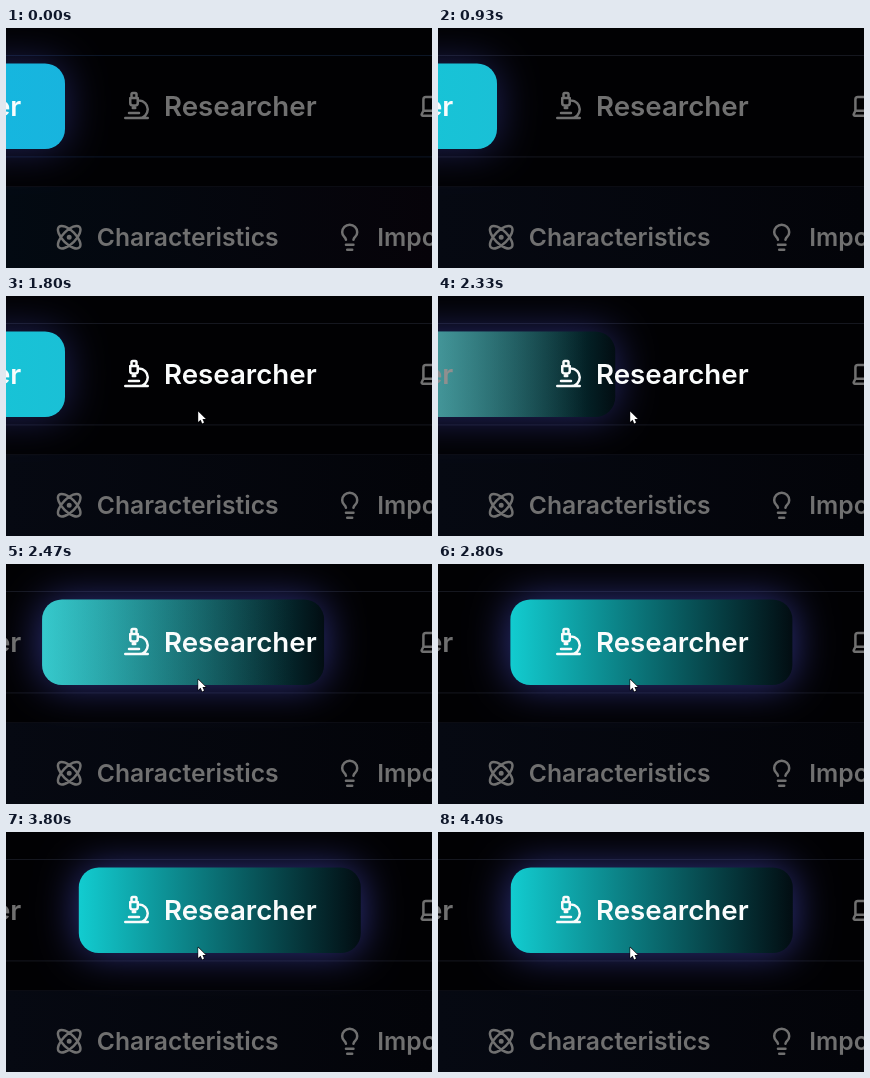
Write an HTML page with a canvas that moves like this. It is 426 px wide and 240 px high and loops after 5.87 s.

```html
<!DOCTYPE html>
<html lang="en">
<head>
<meta charset="utf-8">
<title>Role tabs</title>
<style>
html, body { margin: 0; width: 100%; height: 100%; overflow: hidden; background: #000; }
canvas { display: block; width: 426px; height: 240px; }
</style>
</head>
<body>
<canvas id="stage"></canvas>
<script>
const W = 426, H = 240, LOOP = 5870;
const canvas = document.getElementById('stage');
const ctx = canvas.getContext('2d');
const dpr = window.devicePixelRatio || 1;
canvas.width = Math.round(W * dpr);
canvas.height = Math.round(H * dpr);

// 24-unit line icons
const ICONS = {
  microscope: 'M6 18h8M3 22h18M14 22a7 7 0 1 0 0-14h-1M9 14h2M9 12a2 2 0 0 1-2-2V6h6v4a2 2 0 0 1-2 2ZM12 6V3a1 1 0 0 0-1-1H9a1 1 0 0 0-1 1v3',
  laptop: 'M20 16V7a2 2 0 0 0-2-2H6a2 2 0 0 0-2 2v9m16 0H4m16 0 1.28 2.55a1 1 0 0 1-.9 1.45H3.62a1 1 0 0 1-.9-1.45L4 16',
  atom: 'M11 12a1 1 0 1 0 2 0a1 1 0 1 0-2 0M20.2 20.2c2.04-2.03.02-7.36-4.5-11.9-4.54-4.52-9.87-6.54-11.9-4.5-2.04 2.03-.02 7.36 4.5 11.9 4.54 4.52 9.87 6.54 11.9 4.5ZM15.7 15.7c4.52-4.54 6.54-9.87 4.5-11.9-2.03-2.04-7.36-.02-11.9 4.5-4.52 4.54-6.54 9.87-4.5 11.9 2.03 2.04 7.36.02 11.9-4.5Z',
  bulb: 'M15 14c.2-1 .7-1.7 1.5-2.5 1-.9 1.5-2.2 1.5-3.5A6 6 0 0 0 6 8c0 1 .2 2.2 1.5 3.5.7.7 1.3 1.5 1.5 2.5M9 18h6M10 22h4'
};
for (const name in ICONS) ICONS[name] = new Path2D(ICONS[name]);
const ARROW = new Path2D('M0 0V10.6L2.4 8.4L4 12L5.8 11.2L4.3 7.7H7.6Z');

const GREY = [112, 112, 112], WHITE = [250, 252, 252], BLUE = [112, 132, 250];

const clamp = v => Math.max(0, Math.min(1, v));
const ramp = (t, from, to) => clamp((t - from) / (to - from));
const lerp = (a, b, k) => a + (b - a) * k;
const mix = (a, b, k) => a.map((v, i) => lerp(v, b[i], k));
const rgb = (c, alpha = 1) => `rgba(${c.map(Math.round).join(',')},${alpha})`;

function box(x, y, w, h, r) {
  ctx.beginPath();
  ctx.roundRect(x, y, w, h, r);
}

function shade(x0, x1, from, to) {
  const g = ctx.createLinearGradient(x0, 0, x1, 0);
  g.addColorStop(0, from);
  g.addColorStop(1, to);
  return g;
}

function icon(name, cx, cy, color, scale = 1.25) {
  ctx.save();
  ctx.translate(cx - 12 * scale, cy - 12 * scale);
  ctx.scale(scale, scale);
  ctx.lineWidth = 2;
  ctx.lineCap = ctx.lineJoin = 'round';
  ctx.strokeStyle = rgb(color);
  ctx.stroke(ICONS[name]);
  ctx.restore();
}

function label(text, x, y, size, color, align = 'left') {
  ctx.font = `600 ${size}px Inter, "Open Sans", sans-serif`;
  ctx.textAlign = align;
  ctx.fillStyle = rgb(color);
  ctx.fillText(text, x, y);
}

function backdrop(warm) {
  ctx.fillStyle = '#010103';
  ctx.fillRect(0, 0, W, H);
  ctx.fillStyle = shade(0, W, rgb(mix([3, 10, 18], [6, 9, 18], warm)), rgb(mix([6, 3, 9], [3, 4, 9], warm)));
  ctx.fillRect(0, 158, W, H - 158);
  ctx.fillStyle = rgb(mix([12, 22, 38], [21, 23, 31], warm));
  ctx.fillRect(0, 27, W, 1);
  ctx.fillRect(0, 128.4, W, 1);
  ctx.fillStyle = 'rgb(11,12,19)';
  ctx.fillRect(0, 158, W, 1);
}

// Active pill sliding from the first tab to the second
function pill(p, blend, warm) {
  const x = lerp(-223, 72.8, p), y = 35.5, w = 282, h = 85.5;
  const left = mix([14, 190, 226], [14, 206, 216], warm);
  const right = mix([24, 180, 222], [26, 192, 214], warm);
  ctx.save();
  ctx.shadowColor = rgb([80, 86, 220], lerp(0.4, 0.6, p));
  ctx.shadowBlur = 42 * dpr;
  ctx.fillStyle = shade(x, x + w, rgb(mix(left, [18, 204, 208], blend)), rgb(mix(right, [2, 13, 18], blend)));
  box(x, y, w, h, 20);
  ctx.fill();
  ctx.restore();

  const haze = 0.5 * Math.sin(Math.PI * p);
  if (haze > 0.01) {
    ctx.fillStyle = shade(x, x + w * 0.9, `rgba(210,190,190,${haze})`, 'rgba(210,190,190,0)');
    box(x, y, w, h, 20);
    ctx.fill();
  }
}

function cursor(t) {
  if (t < 930) return;
  const k = ramp(t, 930, 1480);
  ctx.save();
  ctx.translate(lerp(210, 192.2, 1 - (1 - k) ** 2.6), lerp(245, 115.4, 1 - (1 - k) ** 1.36));
  ctx.lineWidth = 1.2;
  ctx.lineJoin = 'round';
  ctx.strokeStyle = '#08080c';
  ctx.stroke(ARROW);
  ctx.fillStyle = '#fff';
  ctx.fill(ARROW);
  ctx.restore();
}

function draw(t) {
  const warm = ramp(t, 130, 600);
  const s = Math.max(0, t - 2245) * 0.016;
  const p = 1 - (1 + s) * Math.exp(-s);
  const blend = ramp(t, 2245, 2330);
  const hover = ramp(t, 950, 1090) * (1 - ramp(t, 1205, 1400));
  const lit = ramp(t, 1440, 1640);

  ctx.setTransform(dpr, 0, 0, dpr, 0, 0);
  backdrop(warm);
  pill(p, blend, warm);

  label('Explorer', 15.3, 88, 27.7, mix(WHITE, GREY, ramp(t, 2230, 2360)), 'right');
  const main = mix(GREY, WHITE, lit);
  icon('microscope', 130.5, 77.6, main);
  label('Researcher', 158, 88, 27.7, main);
  icon('laptop', 427.4, 77.8, GREY);

  if (hover > 0) {
    ctx.fillStyle = rgb([64, 72, 190], 0.25 * hover);
    box(32, 181, 258, 57, 15);
    ctx.fill();
  }
  const sub = mix(GREY, BLUE, hover);
  icon('atom', 63.2, 209.2, sub);
  label('Characteristics', 90.8, 218, 24.7, sub);
  icon('bulb', 343.7, 209.2, GREY);
  label('Important', 371.2, 218, 24.7, GREY);

  cursor(t);
}

const start = performance.now();
function tick() {
  draw((performance.now() - start) % LOOP);
  requestAnimationFrame(tick);
}
tick();
</script>
</body>
</html>
```
